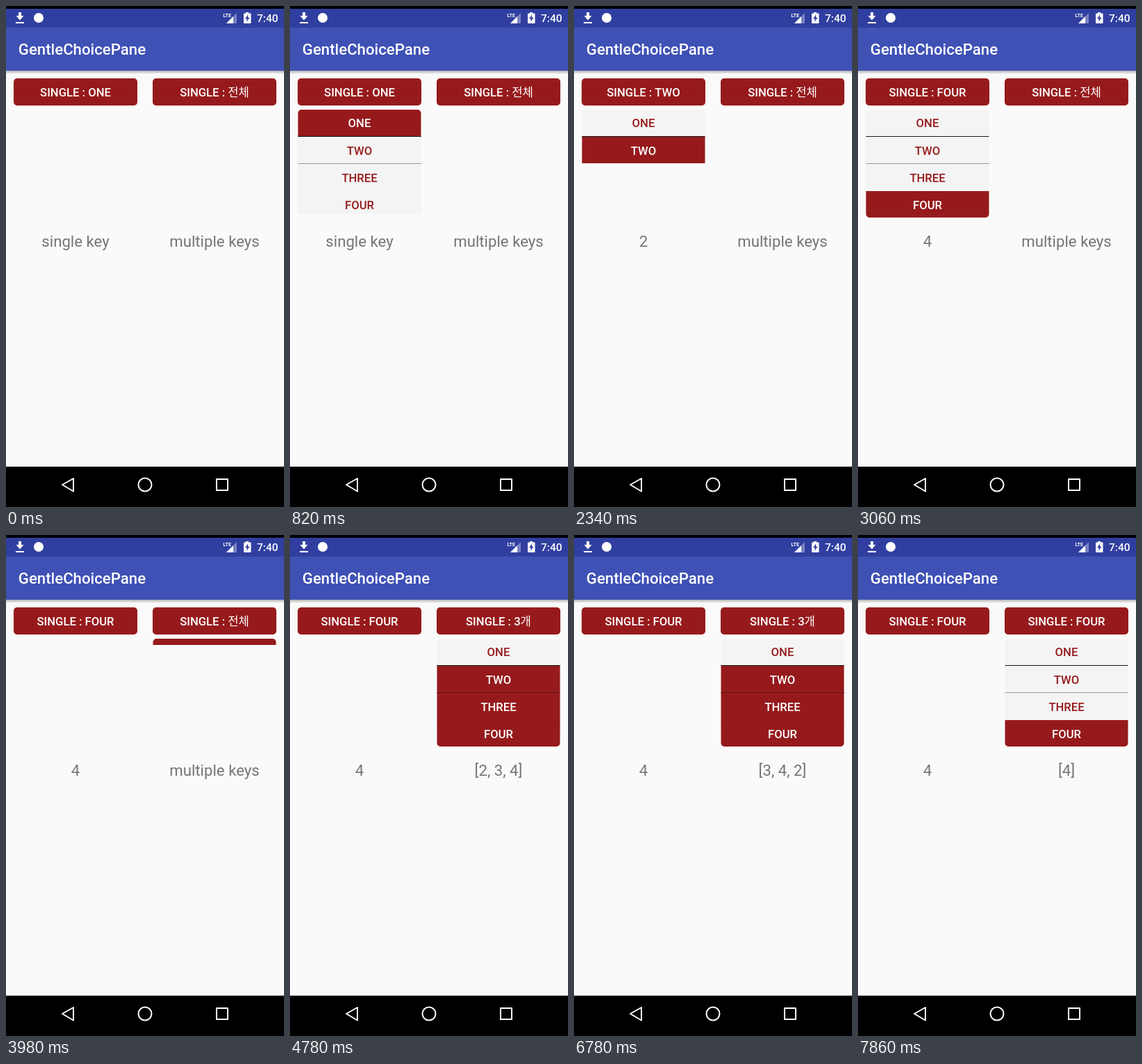
An HTML page with a canvas for the animation above (8000 ms loop, 400x720 px).

```html
<!DOCTYPE html>
<html lang="en">
<head>
<meta charset="utf-8">
<title>Select boxes</title>
<style>
  html, body { margin: 0; width: 100%; height: 100%; overflow: hidden; background: #000; }
  canvas { display: block; }
</style>
</head>
<body>
<canvas id="stage" width="400" height="720"></canvas>
<script>
const ctx = document.getElementById('stage').getContext('2d');

const LOOP = 8000, STEP = 40, PHASE = 20, SLIDE = 250;
const SANS = 'Roboto, "Noto Sans CJK KR", "Noto Sans CJK JP", sans-serif';
const PAPER = '#fafafa', ROW_FILL = '#f4f4f4', RED = '#961a1c';
const WHITE = '#fff', GREY = '#757575', INDIGO = '#3f51b5', NAVY = '#303f9f';
const NAMES = ['ONE', 'TWO', 'THREE', 'FOUR'];
const LIST_TOP = 149, LIST_HEIGHT = 155, ROW = 39.2;

// Choices are [time, selected keys, result text]; slides are [start time, open].
const left = {
  x: 11,
  choices: [[0, [1], 'single key'], [1380, [2], '2'], [3060, [4], '4']],
  slides: [[600, 1], [1515, 0], [2215, 1], [3195, 0]]
};
const right = {
  x: 211,
  choices: [
    [0, [1, 2, 3, 4], 'multiple keys'],
    ...[
      [4580, [2, 3, 4]], [5260, [3, 4]], [5780, [3, 4, 1]], [6340, [3, 4, 1, 2]],
      [6780, [3, 4, 2]], [7180, [3, 4]], [7620, [4]]
    ].map(([time, keys]) => [time, keys, `[${keys.join(', ')}]`])
  ],
  slides: [[3941, 1]]
};

const latest = (events, t) => events.filter(([time]) => time <= t).pop();
const ease = p => (1 - Math.cos(Math.PI * Math.min(1, p))) / 2;

function openness(slides, t) {
  const slide = latest(slides, t);
  if (!slide) return 0;
  const p = ease((t - slide[0]) / SLIDE);
  return slide[1] ? p : 1 - p;
}

function rect(x, y, w, h, color) {
  ctx.fillStyle = color;
  ctx.fillRect(x, y, w, h);
}

function text(str, x, y, size, weight, color, align = 'center') {
  ctx.font = `${weight} ${size}px ${SANS}`;
  ctx.textAlign = align;
  ctx.fillStyle = color;
  ctx.fillText(str, x, y);
}

function polygon(points, color) {
  ctx.beginPath();
  points.forEach(([x, y]) => ctx.lineTo(x, y));
  ctx.closePath();
  ctx.fillStyle = color;
  ctx.fill();
}

function rounded(x, y, w, h, r) {
  ctx.beginPath();
  ctx.roundRect(x, y, w, h, r);
}

function drawStatusBar() {
  rect(0, 4, 400, 27, NAVY);

  rect(18, 9, 4, 6, WHITE);
  polygon([[14.5, 14], [25.5, 14], [20, 20.5]], WHITE);
  rect(14, 23, 12, 2, WHITE);

  ctx.beginPath();
  ctx.arc(47, 17, 7, 0, 7);
  ctx.fill();

  polygon([[332, 10], [332, 25], [317, 25]], 'rgba(255,255,255,.35)');
  polygon([[327, 15], [327, 25], [317, 25]], WHITE);
  text('LTE', 312.5, 16, 7, 700, WHITE, 'left');

  rect(345, 9, 4, 2, WHITE);
  rounded(342, 10.5, 10.5, 14.5, 1);
  ctx.fill();
  polygon([[348.3, 12], [344, 18.5], [346.7, 18.5], [346.2, 23], [350.5, 16.6], [347.9, 16.6]], NAVY);

  text('7:40', 361, 23, 15.5, 500, WHITE, 'left');
}

function drawAppBar() {
  const shadow = ctx.createLinearGradient(0, 93, 0, 98);
  shadow.addColorStop(0, 'rgba(70,70,70,.4)');
  shadow.addColorStop(1, 'rgba(70,70,70,0)');
  rect(0, 93, 400, 5, shadow);
  rect(0, 31, 400, 62, INDIGO);
  text('GentleChoicePane', 17.8, 70, 22.2, 500, WHITE, 'left');
}

function drawNavBar() {
  rect(0, 662, 400, 58, '#000');
  ctx.strokeStyle = WHITE;
  ctx.lineWidth = 2;
  ctx.lineJoin = 'round';
  ctx.beginPath();
  ctx.moveTo(81, 688);
  ctx.lineTo(97, 679);
  ctx.lineTo(97, 697.5);
  ctx.closePath();
  ctx.moveTo(209.5, 688);
  ctx.arc(200, 688, 9.5, 0, 2 * Math.PI);
  ctx.rect(303, 680, 16, 16);
  ctx.stroke();
}

function drawButton(x, keys) {
  rounded(x, 104, 178, 39, 5);
  ctx.fillStyle = RED;
  ctx.fill();

  const prefix = 'SINGLE : ';
  if (keys.length === 1) {
    text(prefix + NAMES[keys[0] - 1], x + 89, 130, 16.67, 500, WHITE);
    return;
  }
  const all = keys.length === NAMES.length;
  const count = all ? '' : String(keys.length);
  const suffix = all ? '전체' : '개';
  const parts = [[prefix + count, 500], [suffix, 300]].map(([str, weight]) => {
    ctx.font = `${weight} 16.67px ${SANS}`;
    return { str, weight, width: ctx.measureText(str).width };
  });
  let pen = x + 89 - (parts[0].width + parts[1].width) / 2;
  for (const { str, weight, width } of parts) {
    text(str, pen, 130, 16.67, weight, WHITE, 'left');
    pen += width;
  }
}

function drawList(x, keys, open) {
  const height = Math.round(LIST_HEIGHT * open);
  if (!height) return;
  ctx.save();
  ctx.beginPath();
  ctx.rect(x, LIST_TOP, 178, height);
  ctx.clip();
  rounded(x + 0.5, LIST_TOP, 177, LIST_HEIGHT, 5);
  ctx.clip();
  NAMES.forEach((name, i) => {
    const selected = keys.includes(i + 1);
    const top = Math.round(LIST_TOP - 1 + i * ROW);
    const baseline = Math.ceil(LIST_TOP + 25 + i * ROW);
    rect(x, top, 178, 41, selected ? RED : ROW_FILL);
    text(name, x + 89, baseline, 16.67, 500, selected ? WHITE : RED);
  });
  rect(x, 187, 178, 1, '#141414');
  rect(x, 226, 178, 1, 'rgba(16,16,16,.4)');
  ctx.restore();
}

function drawColumn({ x, choices, slides }, t) {
  const [, keys, result] = latest(choices, t);
  drawButton(x, keys);
  text(result, x + 89, 346, 22.2, 400, GREY);
  drawList(x, keys, openness(slides, t));
}

function draw(now) {
  const elapsed = now % LOOP;
  const t = Math.max(0, Math.floor((elapsed - PHASE) / STEP) * STEP + PHASE);
  rect(0, 0, 400, 720, '#000');
  rect(0, 93, 400, 569, PAPER);
  drawStatusBar();
  drawAppBar();
  drawNavBar();
  drawColumn(left, t);
  drawColumn(right, t);
}

const start = performance.now();
function tick() {
  draw(performance.now() - start);
  requestAnimationFrame(tick);
}
tick();
</script>
</body>
</html>
```
